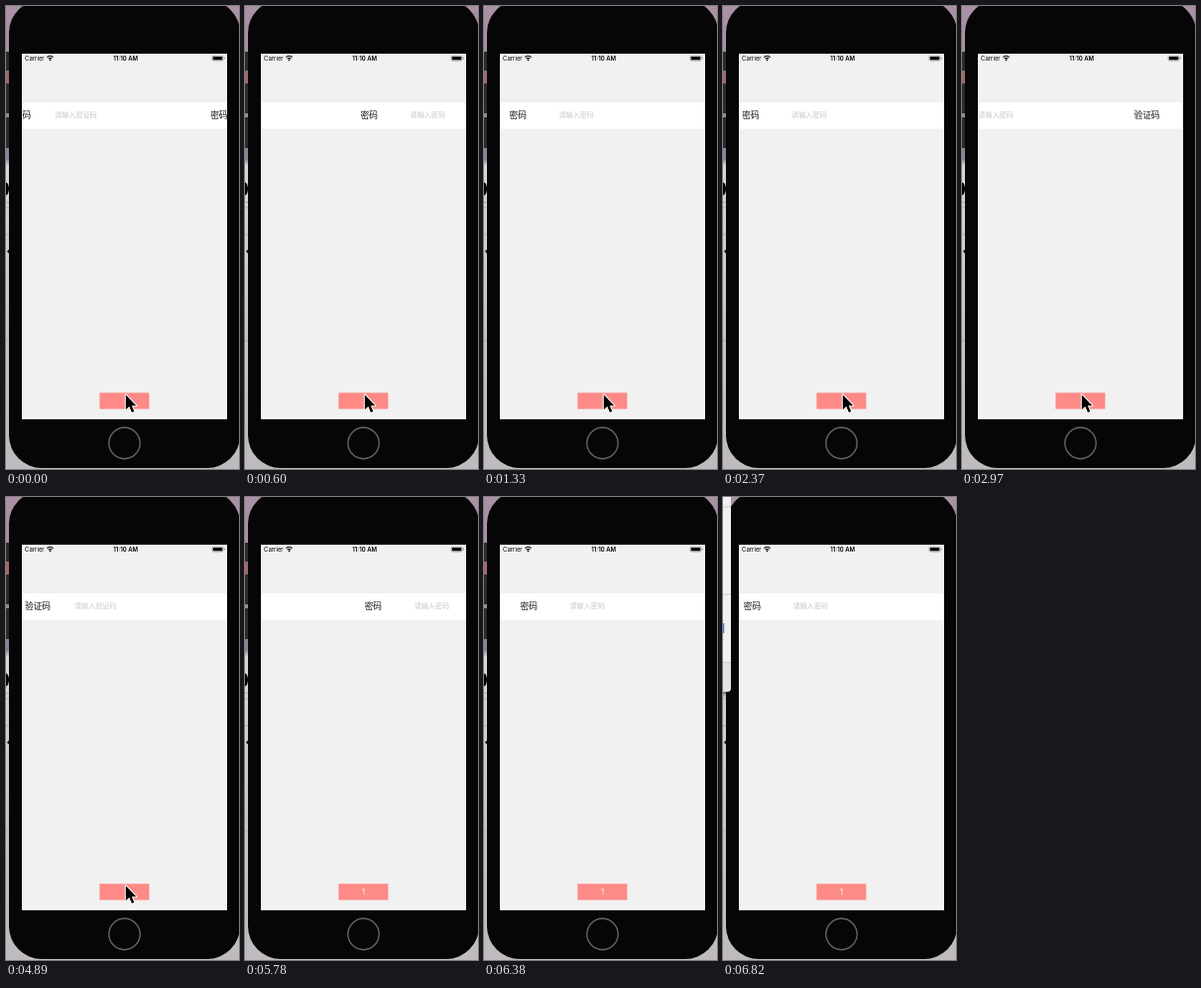
These frames come from a looping animation (235x466 px, 8 s). An HTML page:

```html
<!DOCTYPE html>
<html lang="zh">
<head>
<meta charset="utf-8">
<style>
html, body { margin: 0; width: 100%; height: 100%; overflow: hidden; }
svg { display: block; width: 235px; height: 466px; font-family: Inter, "Noto Sans CJK SC", "Noto Sans CJK", sans-serif; }
.cell { font-family: "Noto Sans CJK SC", "Noto Sans CJK", sans-serif; }
.label { font-size: 8.7px; fill: #111; }
.hint { font-size: 7.1px; fill: #c7c7cc; }
</style>
</head>
<body>
<svg viewBox="0 0 235 466">
  <defs>
    <linearGradient id="desk" x2="0" y2="1">
      <stop offset="0" stop-color="#ab91a6"/>
      <stop offset=".2" stop-color="#a5899a"/>
      <stop offset=".33" stop-color="#8c8098"/>
      <stop offset=".345" stop-color="#d8d8da"/>
      <stop offset=".72" stop-color="#c4c4c8"/>
      <stop offset="1" stop-color="#bebabe"/>
    </linearGradient>
    <linearGradient id="shade" x2="0" y2="1">
      <stop offset="0" stop-opacity=".4"/>
      <stop offset="1" stop-opacity="0"/>
    </linearGradient>
    <clipPath id="screen"><rect x="16" y="48" width="207" height="367.7"/></clipPath>
  </defs>

  <!-- desktop -->
  <rect width="235" height="466" fill="url(#desk)"/>
  <path d="M0 197.5H4M0 203H4M0 230H4M0 337H4" stroke="#aaa"/>
  <path d="M0 65H4V78H0Z" fill="#a06a6c"/>
  <path d="M0 46H4V65H0ZM0 78H4V108H0ZM0 112H4V143H0Z" fill="#2b2a2d"/>
  <ellipse cy="184" rx="3" ry="6.5"/>
  <path d="M1 247L3 245V249Z"/>

  <!-- phone -->
  <rect x="3" y="-6" width="233" height="471" rx="33" fill="#060606"/>
  <circle cx="119.5" cy="440" r="15.7" fill="none" stroke="#656565" stroke-width="1.4"/>
  <g clip-path="url(#screen)">
    <rect x="16" y="47" width="207" height="369" fill="#f1f1f1"/>
    <rect x="16" y="412" width="207" height="4" fill="#f5f5f5"/>
    <rect x="16" y="97" width="207" height="26.7" fill="#fff"/>
    <text x="19" y="55" font-size="6">Carrier</text>
    <g fill="none" stroke="#111" stroke-width="1.1">
      <path d="M41.3 51.6Q44.5 48.9 47.7 51.6M42.6 53.1Q44.5 51.6 46.4 53.1"/>
    </g>
    <circle cx="44.5" cy="54.4" r=".8"/>
    <text x="120.7" y="55" font-size="6" font-weight="600" text-anchor="middle">11:10 AM</text>
    <rect x="208" y="50.2" width="11" height="4.8" rx="1.2" fill="none" stroke="#777" stroke-width=".6"/>
    <rect x="208.8" y="51" width="9.4" height="3.2" rx=".5"/>
    <rect x="219.8" y="51.7" width=".8" height="1.8" fill="#777"/>
    <g class="cell" id="code">
      <text class="label" x="20.7" y="113.4">验证码</text>
      <text class="hint" x="70.7" y="112.2">请输入验证码</text>
    </g>
    <g class="cell" id="pass">
      <text class="label" x="20.7" y="113.4">密码</text>
      <text class="hint" x="70.7" y="112.2">请输入密码</text>
    </g>
    <rect x="94.4" y="389.3" width="50" height="16.3" fill="#fd8a86"/>
    <text id="count" x="119.5" y="400.3" font-size="7.5" fill="#fff" text-anchor="middle">1</text>
  </g>

  <path id="cursor" d="M120.8 391.3V406.3L124.3 403.1L126.9 409L129.3 407.9L126.8 402.3H131.3Z"
    stroke="#fff" stroke-width="2" stroke-linejoin="round" paint-order="stroke"/>

  <!-- window at the left edge -->
  <g id="panel">
    <rect y="196" width="3" height="6" fill="url(#shade)"/>
    <rect x="-10" y="-10" width="18" height="206" rx="4" fill="#f0f0f1"/>
    <path d="M0 167H8V192Q8 196 4 196H0Z" fill="#e5e3e3"/>
    <path d="M0 10H8M0 98H8M0 166.500H8" stroke="#d2cccc"/>
    <rect y="127" width="1.2" height="10" fill="#5a6fd0"/>
  </g>
</svg>
<script>
const $ = id => document.getElementById(id);
const LOOP = 8000, STEP = 148.2, WIDTH = 207, DURATION = 2000;
const slides = [
  { start: -450, from: "code", to: "pass" },
  { start: 2255, from: "pass", to: "code" },
  { start: 4760, from: "code", to: "pass" }
];

// cubic-bezier(.42, 0, .58, 1)
function easeInOut(x) {
  if (x <= 0 || x >= 1) return x <= 0 ? 0 : 1;
  let lo = 0, hi = 1;
  for (let i = 0; i < 24; i++) {
    const s = (lo + hi) / 2, r = 1 - s;
    if (1.26 * r * r * s + 1.74 * r * s * s + s ** 3 < x) lo = s; else hi = s;
  }
  return lo * lo * (3 - 2 * lo);
}

const place = (id, x) => $(id).setAttribute("transform", `translate(${x.toFixed(2)} 0)`);
const show = (id, on) => $(id).style.display = on ? "" : "none";

function draw(now) {
  // the screen refreshes at a fixed, low rate
  const t = Math.floor((now % LOOP + 8) / STEP) * STEP;
  const slide = slides.filter(s => s.start <= t).pop();
  const p = easeInOut((t - slide.start) / DURATION);
  place(slide.from, -WIDTH * p);
  place(slide.to, WIDTH * (1 - p));
  const pointing = t < 5400;
  show("cursor", pointing);
  show("count", !pointing);
  show("panel", t > 6500);
}

const begin = performance.now();
function tick() {
  draw(performance.now() - begin);
  requestAnimationFrame(tick);
}
tick();
</script>
</body>
</html>
```
